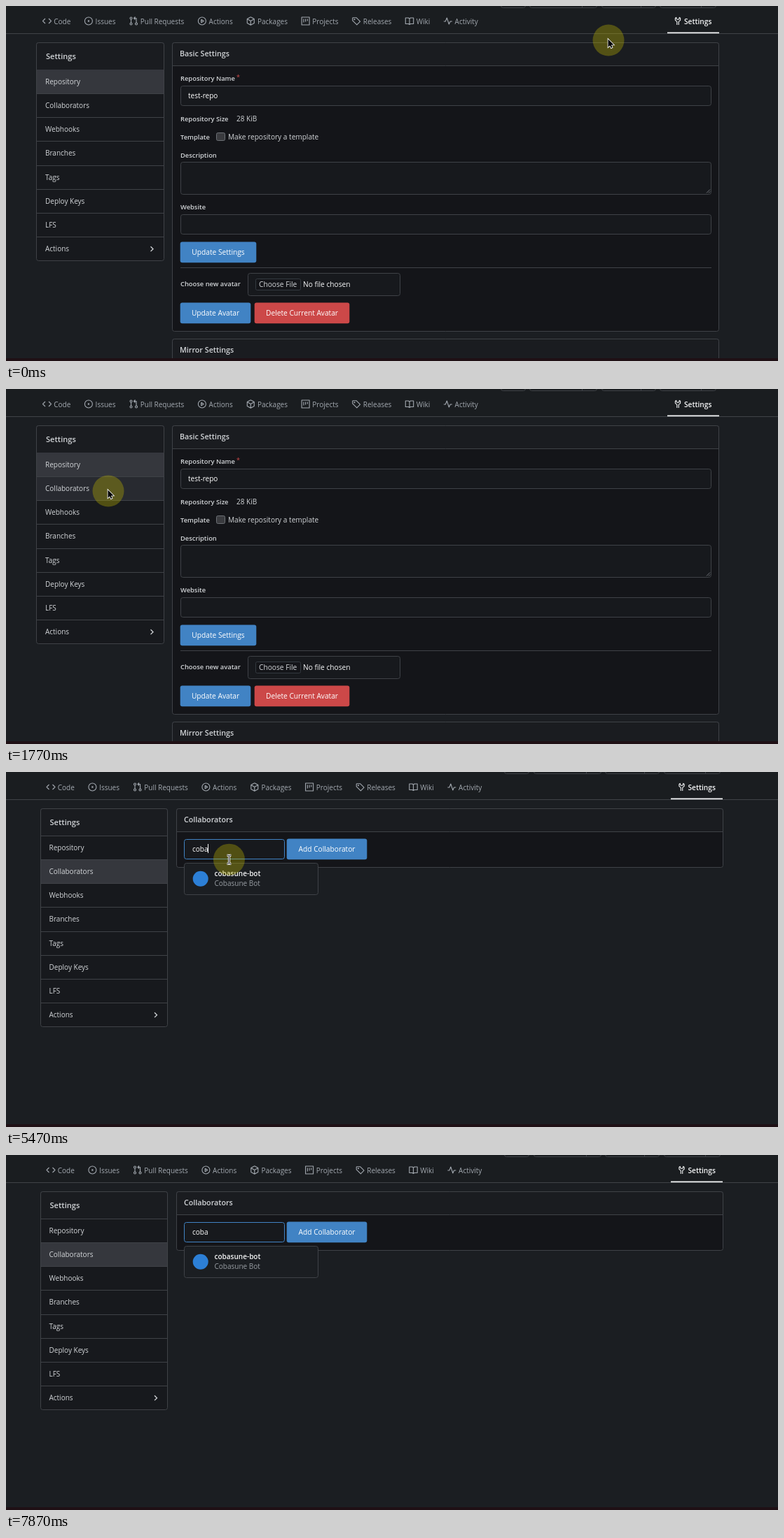
An HTML page with a canvas that plays this animation: 1102 px wide and 508 px high, repeating every 8000 ms.

```html
<!DOCTYPE html>
<html lang="en">
<head>
<meta charset="utf-8">
<title>Repository settings</title>
<style>
  html, body { margin: 0; width: 100%; height: 100%; overflow: hidden; background: #1b1e22; }
  canvas { display: block; }
</style>
</head>
<body>
<canvas id="stage" width="1102" height="508"></canvas>
<script>
const ctx = document.getElementById('stage').getContext('2d');
const LOOP = 8000;
const PAGE_SWITCH = 1930;
const TYPE_START = 3730, KEY_GAP = 90;
const MENU_OPEN = 4130;
const FADE_END = 7870, FADE = 240;
const QUERY = 'coba';
const FONT = '"Open Sans", "Noto Sans", sans-serif';

const C = {
  body: '#1b1e22', nav: '#1a1d20', head: '#1a1c20', panel: '#141519', input: '#17191d',
  line: '#3f4247', text: '#d2d5d8', bright: '#f6f7f8', dim: '#a3a9b0', faint: '#777c83',
  active: '#35373d', hover: '#282a30', blue: '#4183c4', red: '#cc4848'
};

const ROWS = ['Repository', 'Collaborators', 'Webhooks', 'Branches', 'Tags', 'Deploy Keys', 'LFS', 'Actions'];
const ROW_TOP = 91, ROW_H = 34.25;

// key points of the pointer: time, x, y
const PATH = [
  [30, 860, 49], [470, 415, 181], [830, 149, 167], [1200, 146, 146], [1770, 146, 146],
  [2230, 306, 127], [2530, 279, 118], [2900, 279, 118], [3270, 367, 116], [3630, 318, 119],
  [5430, 318, 119], [5760, 332, 264], [6030, 340, 178], [6300, 338, 153]
];

function slope(i, axis) {
  if (i === 0 || i === PATH.length - 1) return 0;
  const [p, q, r] = PATH.slice(i - 1, i + 2);
  const a = (q[axis] - p[axis]) / (q[0] - p[0]);
  const b = (r[axis] - q[axis]) / (r[0] - q[0]);
  return a * b <= 0 ? 0 : 2 * a * b / (a + b);
}

// smooth curve through the key points that never overshoots them
function pathAt(t, axis) {
  const last = PATH.length - 1;
  if (t <= PATH[0][0]) return PATH[0][axis];
  if (t >= PATH[last][0]) return PATH[last][axis];
  let i = 0;
  while (t >= PATH[i + 1][0]) i++;
  const p = PATH[i], q = PATH[i + 1], d = q[0] - p[0];
  const u = (t - p[0]) / d, u2 = u * u, u3 = u2 * u;
  return p[axis] * (2 * u3 - 3 * u2 + 1) + q[axis] * (3 * u2 - 2 * u3)
    + d * (slope(i, axis) * (u3 - 2 * u2 + u) + slope(i + 1, axis) * (u3 - u2));
}

const inside = (p, x0, y0, x1, y1) => p.x >= x0 && p.x <= x1 && p.y >= y0 && p.y <= y1;

// draws text around a middle line and returns its width
function text(s, x, mid, { size = 10, weight = 400, color = C.text, align = 'left' } = {}) {
  ctx.font = `${weight} ${size}px ${FONT}`;
  ctx.textAlign = align;
  ctx.fillStyle = color;
  ctx.fillText(s, x, mid + 3.7);
  return ctx.measureText(s).width;
}
const title = (s, x, y, size = 10.7) => text(s, x, y, { size, weight: 600 });
const label = (s, x, y) => text(s, x, y, { size: 9.35, weight: 600 });

// rectangle with pixel-aligned border
function box(x0, y0, x1, y1, fill, stroke = C.line, r = 3) {
  const x = Math.floor(x0) + .5, y = Math.floor(y0) + .5;
  ctx.beginPath();
  ctx.roundRect(x, y, Math.floor(x1) - .5 - x, Math.floor(y1) - .5 - y, r);
  if (fill) { ctx.fillStyle = fill; ctx.fill(); }
  ctx.strokeStyle = stroke;
  ctx.lineWidth = 1;
  ctx.stroke();
}

function fillRect(x, y, w, h, color) {
  ctx.fillStyle = color;
  ctx.fillRect(x, y, w, h);
}
const hline = (x0, x1, y) => fillRect(x0, Math.floor(y), x1 - x0, 1, C.line);

function strokePath(build, color, width) {
  ctx.beginPath();
  build();
  ctx.strokeStyle = color;
  ctx.lineWidth = width;
  ctx.stroke();
}

function button(s, x, y, w, color) {
  ctx.beginPath();
  ctx.roundRect(x - .3, y - .4, w + .6, 29.6, 3);
  ctx.fillStyle = color;
  ctx.fill();
  text(s, x + w / 2, y + 14.4, { size: 10.2, color: '#fff', align: 'center' });
}

function panel(name, x, y, bottom) {
  box(x, y, x + 781, bottom, C.panel);
  box(x, y, x + 781, y + 34, C.head, C.line, [3, 3, 0, 0]);
  title(name, x + 11, y + 16.5);
}

function circle(x, y, r) { ctx.moveTo(x + r, y); ctx.arc(x, y, r, 0, 7); }
function poly(...p) {
  ctx.moveTo(p[0], p[1]);
  for (let i = 2; i < p.length; i += 2) ctx.lineTo(p[i], p[i + 1]);
}
function mirrored(...p) {
  poly(...p);
  poly(...p.map((v, i) => i % 2 ? v : -v));
}

// icons drawn around their own centre
const ICONS = {
  code() { mirrored(2.5, -3.5, 6, 0, 2.5, 3.5); },
  issue() { circle(0, 0, 5.5); circle(0, 0, .7); },
  pull() {
    circle(-3.5, -4, 1.5); circle(-3.5, 4, 1.5); circle(4, 4, 1.5);
    poly(-3.5, -2.5, -3.5, 2.5); poly(4, 2.5, 4, -4, .5, -4); poly(2.5, -6, .5, -4, 2.5, -2);
  },
  play() { circle(0, 0, 5.5); poly(-1.2, -2.2, 2.3, 0, -1.2, 2.2, -1.2, -2.2); },
  cube() { mirrored(0, -5.7, 5, -3, 5, 3, 0, 5.7, 0, 0, 5, -3); },
  board() { ctx.rect(-5.5, -5.5, 11, 11); for (const i of [-1, 0, 1]) poly(i * 2.7, -3, i * 2.7, 1 - i); },
  tag() { poly(-5.3, -4.8, 0, -4.8, 5.5, .6, .8, 5.3, -5.3, -.6, -5.3, -4.8); circle(-2.6, -2.2, .5); },
  book() { mirrored(0, -3.3, 1.5, -4.5, 5.7, -4.5, 5.7, 4, 1.5, 4, 0, 5, 0, -3.3); },
  pulse() { poly(-6, .5, -3.5, .5, -1.5, -4.5, 1.5, 4.5, 3.3, .5, 6, .5); },
  tool() { mirrored(1.2, 5.5, 1.2, .8, 3.6, -1.2, 3.6, -4, 2.3, -5.2, 1.3, -2.2, 0, -2.2); }
};

function icon(name, x, y, color = C.dim) {
  ctx.save();
  ctx.translate(x, y);
  ctx.lineJoin = 'round';
  strokePath(ICONS[name], color, 1.1);
  ctx.restore();
}

const TABS = {
  code: 'Code', issue: 'Issues', pull: 'Pull Requests', play: 'Actions', cube: 'Packages',
  board: 'Projects', tag: 'Releases', book: 'Wiki', pulse: 'Activity'
};

function navBar(dx) {
  fillRect(0, 0, 1102, 39, C.nav);
  hline(0, 1102, 39);
  let x = 706 + dx;
  for (const w of [36, 97, 78, 81]) {
    box(x, -20, x + w, 3, null);
    if (w > 36) fillRect(Math.floor(x + w - 22), 0, 1, 2, C.line);
    x += w + 5.6;
  }
  x = 58.5 + dx;
  for (const name in TABS) {
    icon(name, x, 21.5);
    x += 35.3 + text(TABS[name], x + 9.7, 22, { color: C.dim });
  }
  icon('tool', 959 + dx, 21.5, C.bright);
  text('Settings', 968 + dx, 22, { size: 10.2, weight: 600, color: C.bright });
  fillRect(Math.round(943.6 + dx), 37.5, 74, 1.7, C.bright);
}

function sideBar(dx, current, tip) {
  const x0 = Math.floor(43.5 + dx), x1 = Math.floor(226 + dx);
  box(x0, 52, x1, 365, C.input);
  box(x0, 52, x1, 92, C.head, C.line, [3, 3, 0, 0]);
  title('Settings', 57 + dx, 72.5, 11.1);
  ROWS.forEach((s, i) => {
    const y = ROW_TOP + i * ROW_H;
    const over = inside(tip, x0, y, x1, y + ROW_H);
    if (i === current) fillRect(x0 + 1, y, x1 - x0 - 2, ROW_H, C.active);
    else if (over) fillRect(x0 + 1, y, x1 - x0 - 2, ROW_H, C.hover);
    if (i) hline(x0 + 1, x1 - 1, y);
    text(s, 56 + dx, y + 17);
  });
  const ax = 206.5 + dx, ay = 347.7;
  strokePath(() => poly(ax, ay - 3.4, ax + 3.5, ay, ax, ay + 3.4), C.text, 1.3);
}

function repositoryPage() {
  const left = 249, right = 1007;
  const field = (y, h) => box(left, y, right, y + h, C.input);
  panel('Basic Settings', 237, 52, 466);
  label('Repository Name', left, 103.5);
  text('*', 329, 101, { size: 9, color: C.red });
  field(114, 29);
  text('test-repo', 260, 128.5, { color: '#fff' });
  label('Repository Size', left, 161.5);
  text('28 KiB', 329, 161.5);
  label('Template', left, 187.5);
  box(300, 181, 313, 193, '#3a3b3f', '#6d7176', 2);
  text('Make repository a template', 317, 187.5, { size: 10.1 });
  label('Description', left, 213);
  field(223, 47);
  strokePath(() => {
    poly(1000, 267.5, 1005, 262.5);
    poly(1003, 267.5, 1005, 265.5);
  }, '#8b8f94', .8);
  label('Website', left, 287.5);
  field(298, 29);
  button('Update Settings', left, 338, 108, C.blue);
  hline(left, right, 374.5);
  label('Choose new avatar', left, 397.5);
  box(345, 382, 563, 415, C.input);
  box(356, 390, 421, 407, C.panel, '#343a40', 2);
  text('Choose File', 361, 398.5, { size: 10.2 });
  text('No file chosen', 424, 398.5, { size: 10.2, color: C.bright });
  button('Update Avatar', left, 425, 100, C.blue);
  button('Delete Current Avatar', 355, 425, 135, C.red);
  panel('Mirror Settings', 237, 476, 540);
}

function caretOn(t) {
  if (t < TYPE_START) return Math.floor((t - PAGE_SWITCH) / 500) % 2 === 0;
  return Math.floor((t - 4050) / 525) % 2 === 0 || t < MENU_OPEN;
}

function collaboratorsPage(t, tip, shown) {
  panel('Collaborators', 243, 52, 137);
  box(254, 96, 398, 125, C.input, C.blue);
  const keys = Math.max(0, Math.floor((t - TYPE_START) / KEY_GAP) + 1);
  const typed = QUERY.slice(0, keys);
  let caretX = 265.5;
  if (typed) caretX += text(typed, 266, 110.5, { color: '#fff' });
  else text('Search users...', 266, 110.5, { color: C.faint });
  if (caretOn(t)) fillRect(Math.round(caretX), 103, 1, 13, C.bright);
  button('Add Collaborator', 401, 96, 114, C.blue);
  if (t >= MENU_OPEN) userMenu(tip, shown);
}

function userMenu(tip, shown) {
  box(254, 130, 446, 176, C.body);
  if (inside(tip, 254, 130, 446, 177)) {
    ctx.globalAlpha = shown;
    box(254, 130, 446, 176, '#2e3035');
    ctx.globalAlpha = 1;
  }
  ctx.beginPath();
  circle(277.7, 152.7, 11);
  ctx.fillStyle = '#2c7fd6';
  ctx.fill();
  text('cobasune-bot', 297.5, 145.5, { weight: 600, color: C.bright });
  text('Cobasune Bot', 297.5, 159.5, { color: '#989da3' });
}

function beamCursor(x, y) {
  const shape = () => {
    for (const s of [-1, 1]) {
      poly(x - 3, y + s * 6, x - 1, y + s * 6, x, y + s * 5, x + 1, y + s * 6, x + 3, y + s * 6);
    }
    poly(x, y - 5, x, y + 5);
  };
  strokePath(shape, '#fff', 3);
  strokePath(shape, '#000', 1);
}

function arrowCursor(x, y) {
  ctx.save();
  ctx.translate(x, y);
  strokePath(() => {
    poly(0, 0, 0, 11.3, 2.6, 8.9, 4.3, 12.6, 6, 11.8, 4.4, 8.3, 8, 8.1);
    ctx.closePath();
  }, '#fff', 1.6);
  ctx.fillStyle = '#000';
  ctx.fill();
  ctx.restore();
}

function pointer(x, y, tip, beam, shown) {
  ctx.globalAlpha = shown;
  ctx.beginPath();
  circle(x, y, 22.5);
  ctx.fillStyle = 'rgba(190, 182, 0, .35)';
  ctx.fill();
  if (beam) beamCursor(x, y);
  else arrowCursor(tip.x, tip.y);
  ctx.globalAlpha = 1;
}

function draw(t) {
  const second = t >= PAGE_SWITCH;
  const dx = second ? 5.5 : 0;
  const x = pathAt(t, 1), y = pathAt(t, 2), tip = { x: x - .5, y: y - 1.5 };
  const shown = Math.min(1, Math.max(0, (FADE_END - t) / FADE));
  fillRect(0, 0, 1102, 508, C.body);
  navBar(dx);
  sideBar(dx, second ? 1 : 0, tip);
  if (second) collaboratorsPage(t, tip, shown);
  else repositoryPage();
  fillRect(0, 504, 1102, 4, '#1f1015');
  const beam = second ? inside(tip, 254, 96, 398, 124) : inside(tip, 249, 114, 1007, 143);
  if (shown) pointer(x, y, tip, beam, shown);
}

const start = performance.now();
function frame(now) {
  draw(Math.max(0, now - start) % LOOP);
  requestAnimationFrame(frame);
}
draw(0);
requestAnimationFrame(frame);
</script>
</body>
</html>
```
